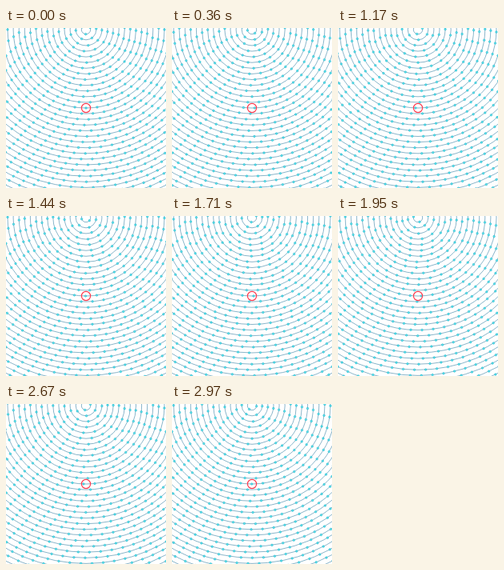
An HTML page with a canvas for the animation above (3000 ms loop, 200x200 px).

```html
<!DOCTYPE html>
<html lang="en">
<head>
<meta charset="utf-8">
<title>Circular flow</title>
<style>
html, body { margin: 0; width: 100%; height: 100%; overflow: hidden; background: #fff; }
canvas { display: block; width: 100vmin; height: 100vmin; }
</style>
</head>
<body>
<canvas id="stage" width="200" height="200"></canvas>
<script>
const ctx = document.getElementById('stage').getContext('2d');
const TAU = Math.PI * 2;
const LOOP = 3000, STEP = 30;
const CX = 100, CY = 2;
const MARKED = 14, MARKED_R = 98, GAP = 7.1;
const SPACING = 14, RINGS = 32;

// Speed falls off as 1/r; each ring advances a whole number of dot spacings per loop.
const rings = Array.from({ length: RINGS }, (_, i) => {
  const k = i + 1;
  const r = MARKED_R + (k - MARKED) * GAP;
  return {
    r,
    count: Math.round(TAU * r / SPACING),
    turns: Math.max(1, Math.round(2 * MARKED / k)),
    phase: ((k - MARKED) * 0.618034) % 1
  };
});

function circle(x, y, r) {
  ctx.beginPath();
  ctx.arc(x, y, r, 0, TAU);
}

function drawLine(ring) {
  circle(CX, CY, ring.r);
  ctx.stroke();
}

function drawDots(ring, p) {
  for (let j = 0; j < ring.count; j++) {
    const a = Math.PI / 2 - TAU * (j + ring.phase + p * ring.turns) / ring.count;
    const x = CX + ring.r * Math.cos(a);
    const y = CY + ring.r * Math.sin(a);
    if (x < -3 || x > 203 || y < -3 || y > 203) continue;
    circle(x, y, 1.25);
    ctx.fill();
    ctx.stroke();
  }
}

function draw(p) {
  ctx.fillStyle = '#fff';
  ctx.fillRect(0, 0, 200, 200);

  ctx.lineWidth = 0.55;
  ctx.strokeStyle = '#2a789c';
  rings.forEach(drawLine);

  ctx.lineWidth = 0.55;
  ctx.strokeStyle = '#1ab0c8';
  ctx.fillStyle = '#62e6ee';
  rings.forEach(ring => drawDots(ring, p));

  ctx.lineWidth = 1.2;
  ctx.strokeStyle = '#ff3c50';
  circle(100, 100, 5.6);
  ctx.stroke();
}

const start = performance.now();
function tick() {
  const t = Math.max(0, performance.now() - start) % LOOP;
  draw(Math.floor(t / STEP) * STEP / LOOP);
  requestAnimationFrame(tick);
}
tick();
</script>
</body>
</html>
```
